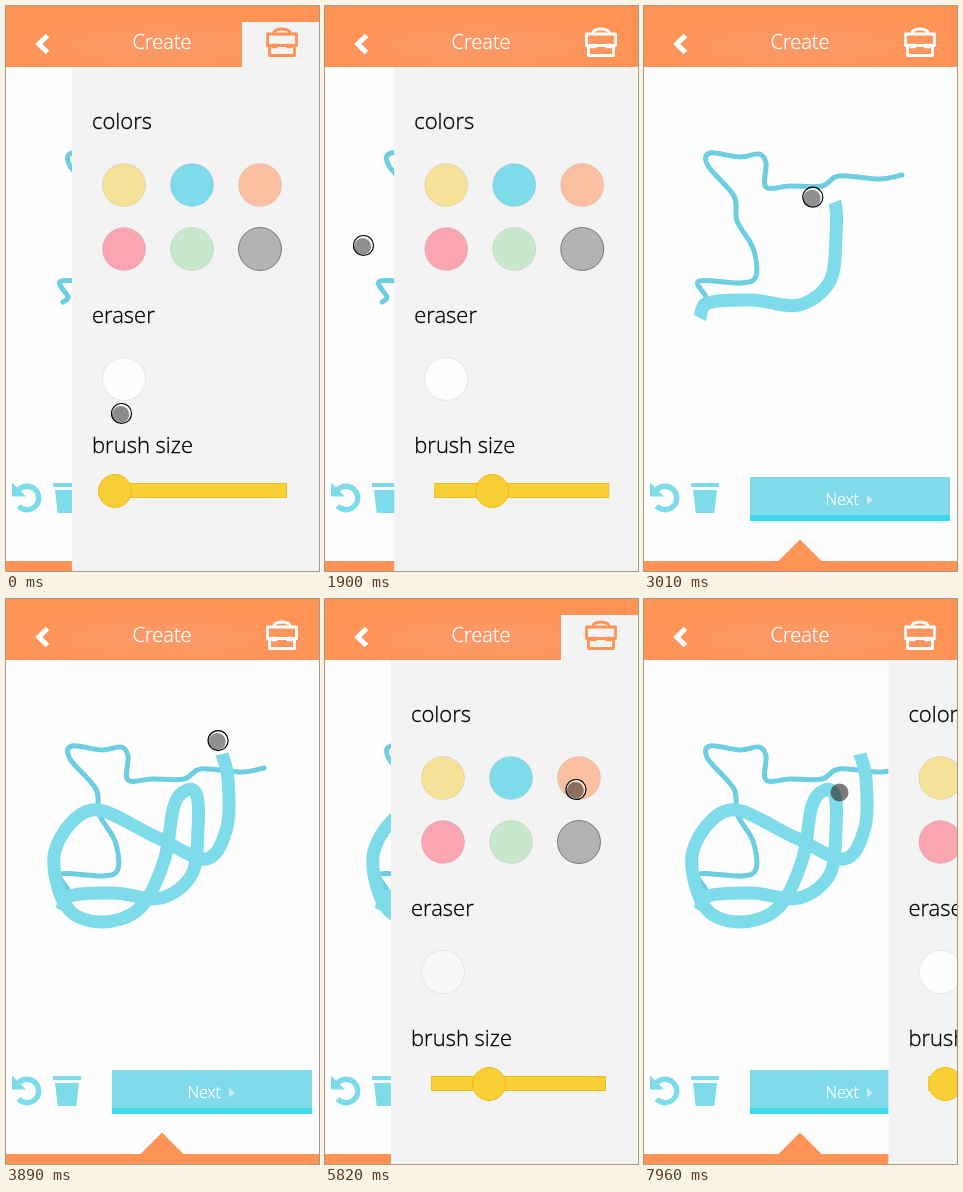
Recreate the animation shown at these times as an HTML page. Size 313 px wide and 565 px high, loop 8000 ms.

```html
<!DOCTYPE html>
<html lang="en">
<head>
<meta charset="utf-8">
<title>Create</title>
<style>
  html, body { margin: 0; width: 100%; height: 100%; overflow: hidden; background: #fefefe; }
  svg { display: block; width: 313px; height: 565px; }
  text { font-family: "Open Sans", "Noto Sans", sans-serif; font-weight: 300; stroke-width: .3px; }
  .label { font-size: 22px; fill: #000; stroke: #000; }
  .light { fill: #fff; stroke: #fff; }
</style>
</head>
<body>
<svg viewBox="0 0 313 565">
  <defs>
    <radialGradient id="glow" cx="50%" cy="65%" r="52%">
      <stop offset="0" stop-color="#f99a6b"/>
      <stop offset="1" stop-color="#ff9355"/>
    </radialGradient>
  </defs>
  <rect width="313" height="565" fill="#fefefe"/>

  <g fill="none" stroke-linejoin="round">
    <path id="thin" stroke="#6dcde1" stroke-width="5" stroke-linecap="round"/>
    <path id="thick" stroke="#7edbea" stroke-width="13"/>
  </g>

  <g fill="#7edbea">
    <path d="M12.5 484A11.7 11.7 0 1 1 12.5 500" fill="none" stroke="#7edbea" stroke-width="5.4"/>
    <path d="M6 476.5V490.5H20Z"/>
    <path d="M47 477H75V481H47ZM49 484H73L70.300 507H51.700Z"/>
  </g>

  <rect x="106" y="471" width="200" height="44" fill="#80daea"/>
  <rect x="106" y="509" width="200" height="6" fill="#3ed8ed"/>
  <text class="light" x="181.500" y="499" font-size="16">Next</text>
  <path d="M223 489V498.500L229 493.700Z" fill="#c9eff5"/>
  <path d="M0 555H134.500L156 533.500L177.500 555H313V565H0Z" fill="#ff9355"/>

  <g id="panel">
    <rect y="61" width="250" height="504" fill="#f3f3f3"/>
    <text class="label" x="20" y="123">colors</text>
    <text class="label" x="20" y="317">eraser</text>
    <text class="label" x="20" y="447">brush size</text>
    <g id="swatches"></g>
    <circle id="eraser" cx="52" cy="373" r="21.500" stroke="#e6e6e6"/>
    <g fill="#f8cf35" stroke="#edbd1c">
      <rect x="40.500" y="477.500" width="174" height="14"/>
      <circle id="knob" cy="485" r="16.500"/>
    </g>
  </g>

  <rect width="313" height="61" fill="url(#glow)"/>
  <path d="M41.500 29.500L32.800 38L41.500 46.500" fill="none" stroke="#fff" stroke-width="5"/>
  <text class="light" x="126.500" y="43" font-size="20">Create</text>
  <rect id="tab" x="236" y="16" width="77" height="45" fill="#f3f3f3"/>
  <g id="box" fill="none" stroke-width="2.800" stroke-linejoin="round">
    <path d="M267.500 28C268 24 271 23 276 23S284 24 284.500 28"/>
    <path d="M261.500 28H290.500V39.500H261.500ZM263.500 40V49.500H288.500V40"/>
    <path d="M265.500 40H271.500M280.500 40H286.500" stroke-width="4.500"/>
  </g>

  <g id="cursor">
    <g id="ring" fill="none">
      <circle r="9" stroke="#fff" stroke-width="2" opacity=".8"/>
      <circle r="10" stroke="#000" stroke-width="1.200"/>
    </g>
    <circle id="dot"/>
  </g>
</svg>

<script>
const LOOP = 8000;
const CLOSE = 1878, REOPEN = 4551, CLOSE_AGAIN = 7739;
const DRAW = 2663, DRAWN = 3890;

const $ = id => document.getElementById(id);
const set = (el, attrs) => { for (const k in attrs) el.setAttribute(k, attrs[k]); };
const clamp = v => Math.max(0, Math.min(1, v));
const ramp = (t, start, dur) => { const v = clamp((t - start) / dur); return v * v * (3 - 2 * v); };

// Smooth path through a few points (Catmull-Rom as Beziers)
function through(p) {
  const handle = (i, sign) => {
    const a = p[Math.max(0, i - 1)], b = p[Math.min(p.length - 1, i + 1)];
    return p[i].map((v, n) => v + sign * (b[n] - a[n]) / 6);
  };
  return "M" + p[0] + p.slice(1).map((q, i) => `C${handle(i, 1)} ${handle(i + 1, -1)} ${q}`).join("");
}

const thin = [[258,169],[236,173],[195,170],[178,180],[146,180],[122,181],[122,157],[115,148],
  [96,151],[66,147],[64,160],[90,190],[93,215],[109,242],[112,270],[97,277],[55,275],[62,291],[57,296]];
const thick = [[56,312],[64,297],[108,294],[155,299],[186,275],[192,230],[191,197],[181,191],
  [168,207],[158,262],[134,309],[95,323],[60,307],[49,252],[86,211],[150,238],[200,260],[221,228],
  [222,180],[216,155]];

set($("thin"), { d: through(thin) });
set($("thick"), { d: through(thick) });
const length = $("thick").getTotalLength();
const inked = t => length * clamp((t - DRAW) / (DRAWN - DRAW));

// While drawing, the pointer runs ahead of the brush and swings wide at turns
function pen(t) {
  const s = Math.min(inked(t) + 9, length - 2);
  const a = $("thick").getPointAtLength(s), b = $("thick").getPointAtLength(s + 2);
  return [a.x + (b.x - a.x) * 8, a.y + (b.y - a.y) * 8];
}

// Pointer moves: start, duration, x, y
const before = [
  [60, 150, 109, 485], [270, 310, 164, 485], [580, 90, 157.5, 472], [1040, 360, 270, 68],
  [1480, 340, 38.5, 239.5], [2300, DRAW - 2300, 58, 300]
];
const after = [
  [4060, 340, 284.5, 30.5], [4900, 520, 251, 190.5], [5880, 700, 163.5, 483.5],
  [6730, 230, 123.5, 483.5], [7110, 430, 280, 40], [7800, 160, 195.5, 193.5]
];
const travel = (from, moves, t) => moves.reduce(([x, y], [start, dur, tx, ty]) => {
  const s = ramp(t, start, dur);
  return [x + (tx - x) * s, y + (ty - y) * s];
}, from);
const pointer = t => t < DRAW ? travel([115.5, 407.5], before, t) : travel(pen(t), after, t);

const swatches = ["#f6e199", "#7edbea", "#fac0a1", "#faa6b0", "#c7e8cb", "#b3b3b3"].map((fill, i) => {
  const c = document.createElementNS("http://www.w3.org/2000/svg", "circle");
  set(c, { cx: 52 + i % 3 * 68, cy: i < 3 ? 179 : 243, r: 21.5, fill, stroke: i < 5 ? "#000" : "#444" });
  c.style.strokeOpacity = i < 5 ? 0.08 : 0.6;
  $("swatches").append(c);
  return c;
});

function draw(t) {
  const slide = ramp(t, CLOSE, 340) - ramp(t, REOPEN, 400) + ramp(t, CLOSE_AGAIN, 340);
  const open = t < CLOSE || (t >= REOPEN && t < CLOSE_AGAIN);
  set($("panel"), { transform: `translate(${66 + 247 * slide} 0)` });
  set($("tab"), { opacity: open ? 1 - slide : 0 });
  set($("box"), { stroke: open ? "#ff9355" : "#fff" });

  const picked = t >= 5880;
  set(swatches[1], { fill: picked ? "#b9e6ef" : "#7edbea" });
  set(swatches[2], { fill: picked ? "#ff914f" : "#fac0a1" });
  set($("eraser"), { fill: t > REOPEN && t < 7130 ? "#f9f9f9" : "#fefefe" });
  set($("knob"), { cx: 43 + 55 * ramp(t, 270, 310) - 41 * ramp(t, 6730, 230) });

  set($("thick"), { "stroke-dasharray": `${inked(t)} ${length + 9}`, visibility: t > DRAW ? "visible" : "hidden" });

  const bare = t >= CLOSE_AGAIN || (t >= 4100 && t < 4910);
  set($("cursor"), { transform: `translate(${pointer(t)})` });
  set($("ring"), { opacity: bare ? 0 : 1 });
  set($("dot"), bare
    ? { cx: 0, cy: 0, r: 9, fill: "rgba(40,40,40,.62)" }
    : { cx: -0.8, cy: 1, r: 8.5, fill: "rgba(0,0,0,.43)" });
}

const start = performance.now();
function frame(now) {
  draw(Math.max(0, now - start) % LOOP);
  requestAnimationFrame(frame);
}
draw(0);
requestAnimationFrame(frame);
</script>
</body>
</html>
```
